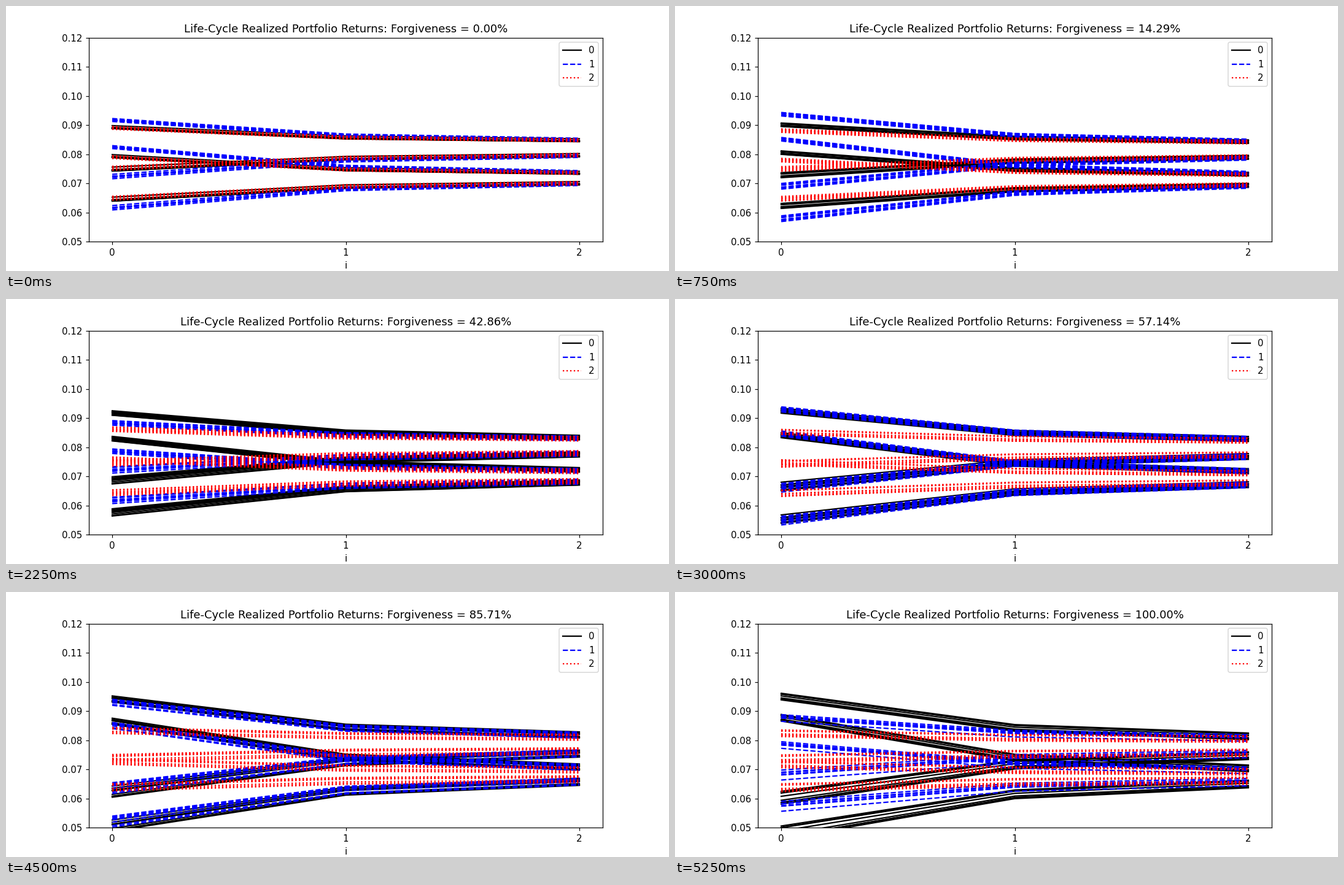
Recreate the animation shown at these times as a matplotlib script. Size 1080x432 px, loop 6 s.

```python
import matplotlib.pyplot as plt
import numpy as np
from matplotlib.animation import FuncAnimation
from matplotlib.collections import LineCollection

STEPS = 8
STYLES = [("black", "-"), ("blue", "--"), ("red", ":")]
BLUE_GAPS = [201, 260, 126, 165, 284, 201, 312, 203]


def start_gap(color, step):
    """Distance at i=0 between the falling and the rising pair of bundles."""
    if color == "black":
        return 0.0146 + 0.0032 * step
    if color == "red":
        return 0.0140 - 0.0008 * step
    return BLUE_GAPS[step] / 1e4


def paths(color, step):
    rng = np.random.default_rng(20 + 3 * step + len(color))
    offsets = np.concatenate([[-1, 1], rng.uniform(-0.9, 0.9, 6)])
    offsets *= 0.0005 + 0.00009 * step

    # The gap decays towards a fixed level from one i to the next.
    gaps = [start_gap(color, step)]
    for _ in range(2):
        gaps.append(0.0026 + 0.27 * gaps[-1])
    gap = np.array(gaps)

    mean = 0.0771 - 0.0006 * step
    falling = mean + gap / 2, 0.0117 - 0.12 * gap, np.ones(3)
    rising = mean - gap / 2, 0.0093 + 0.07 * gap, 1 + 25 * gap

    segments = []
    for centre, split, width in (falling, rising):
        for side in (0.5, -0.5):
            for offset in offsets:
                y = centre + side * split + offset * width
                segments.append(np.column_stack([range(3), y]))
    return segments


fig, ax = plt.subplots(figsize=(10, 4), dpi=108)
ax.set(xlim=(-0.1, 2.1), ylim=(0.05, 0.12), xticks=[0, 1, 2], xlabel="i")
title = ax.set_title("")

bundles = []
for label, (color, style) in enumerate(STYLES):
    ax.plot([], [], color=color, ls=style, lw=1.5, label=str(label))
    cap = "projecting" if style == "-" else "butt"
    lines = LineCollection([], colors=color, linestyles=style, linewidths=1.5,
                           capstyle=cap, joinstyle="round", zorder=2 + label / 10)
    bundles.append(ax.add_collection(lines, autolim=False))
ax.legend(loc="upper right")


def update(step):
    title.set_text("Life-Cycle Realized Portfolio Returns: "
                   f"Forgiveness = {step / (STEPS - 1):.2%}")
    for lines, (color, _) in zip(bundles, STYLES):
        lines.set_segments(paths(color, step))
    return [title, *bundles]


animation = FuncAnimation(fig, update, frames=STEPS, interval=750, repeat=True)
plt.show()
```
